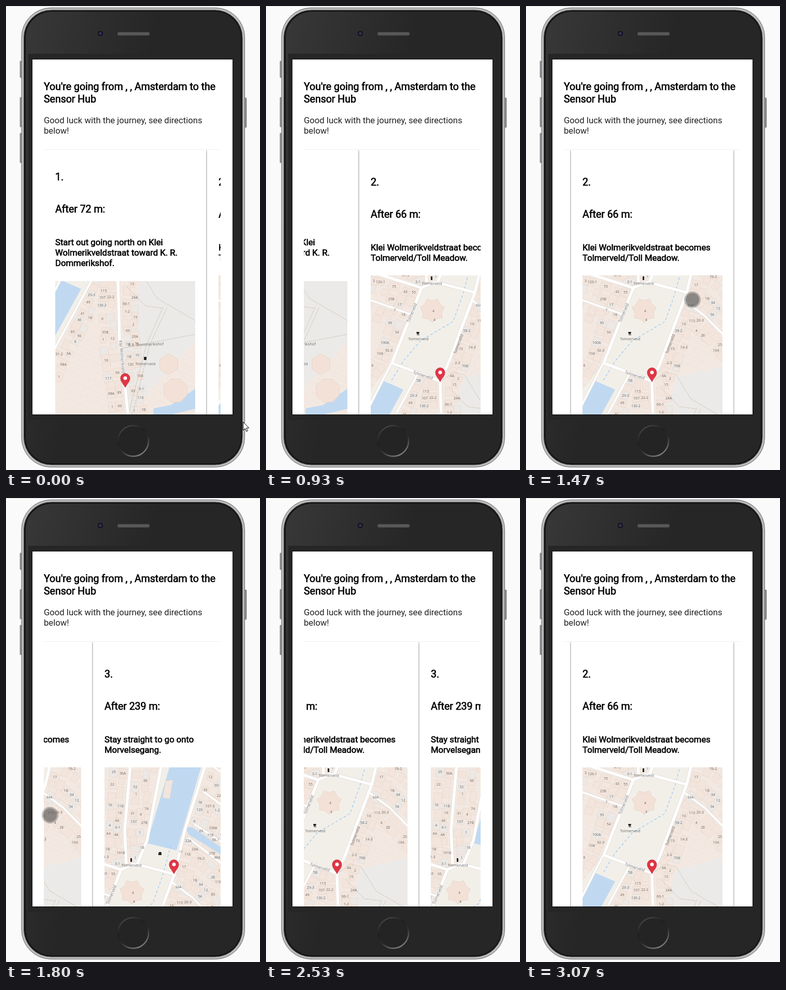
Recreate the animation shown at these times as an HTML page. Size 490 by 894 pixels, loop 3590 ms.

```html
<!DOCTYPE html>
<html lang="en">
<head>
<meta charset="utf-8">
<title>Route directions</title>
<style>
html, body { margin: 0; width: 100%; height: 100%; overflow: hidden; background: #fafafa; }
body { position: relative; font-family: Roboto, sans-serif; color: #000; }
#stage { position: absolute; left: 0; top: 0; width: 490px; height: 894px; overflow: hidden; }
#stage > svg { position: absolute; left: 0; top: 0; }
h2, h3, h4, p { position: absolute; margin: 0; white-space: nowrap; font-weight: 400; }
h2, h3 { font-size: 19.5px; line-height: 24px; }
h4, p { font-size: 16.67px; line-height: 20px; }
h2, h3, h4 { -webkit-text-stroke: .65px #000; }
#screen { position: absolute; left: 51px; top: 103px; width: 386px; height: 684px; background: #fff; }
#screen > h2 { left: 22px; top: 41px; }
#screen > p { left: 22px; top: 108px; color: #222; }
#view { position: absolute; left: 22px; top: 173px; width: 341px; height: 511px; overflow: hidden; }
#track { position: absolute; left: 0; top: 0; height: 100%; }
.card { position: absolute; top: 1px; width: 313px; height: 560px; background: #fff;
  box-shadow: 0 1px 3px rgba(0,0,0,.38); }
.card > * { position: absolute; left: 22px; }
.card svg { width: 270px; height: 300px; overflow: hidden; }
</style>
</head>
<body>
<div id="stage">
<svg width="490" height="894">
  <defs>
    <linearGradient id="face" x1="0" y1="0" x2=".5" y2=".25"><stop offset="0" stop-color="#383838"/><stop offset="1" stop-color="#262626"/></linearGradient>
    <linearGradient id="ring" x1=".2" y1="0" x2=".75" y2="1"><stop offset="0" stop-color="#4b4b4b"/><stop offset=".35" stop-color="#1d1d1d"/><stop offset=".6" stop-color="#2c2c2c"/><stop offset="1" stop-color="#858585"/></linearGradient>
    <pattern id="mesh" width="3" height="3" patternUnits="userSpaceOnUse"><rect width="3" height="3" fill="#5c5c5c"/><path d="M0 0H1V1H0z" fill="#3a3a3a"/></pattern>
  </defs>
  <path d="M0 .5H490" stroke="#e2e2e4"/>
  <g fill="#8c8c92" stroke="#6e6e74" stroke-width=".6">
    <rect x="27" y="106" width="5" height="32" rx="1"/><rect x="27" y="176" width="5" height="57" rx="1"/>
    <rect x="27" y="245" width="5" height="57" rx="1"/><rect x="459" y="177" width="5" height="57" rx="1"/>
  </g>
  <rect x="30" y="3.5" width="430.5" height="885" rx="57" fill="#bbb" stroke="#6a6a6c"/>
  <rect x="34.5" y="8" width="421.5" height="876" rx="53" fill="#151515" stroke="#4a4a4a"/>
  <rect x="38" y="11" width="415" height="870" rx="50" fill="url(#face)"/>
  <rect x="43" y="92" width="402" height="706" fill="#262626"/>
  <rect x="50" y="102" width="388" height="686" fill="#0c0c0c"/>
  <circle cx="182" cy="53" r="6.5" fill="#191922" stroke="#3a3a3e"/><circle cx="182" cy="53" r="2.5" fill="#34345e"/>
  <rect x="215" y="50.5" width="62" height="6" rx="3" fill="url(#mesh)" stroke="#484848"/>
  <circle cx="245.5" cy="838" r="29.5" fill="#242424" stroke="url(#ring)" stroke-width="2.5"/>
</svg>

<div id="screen">
  <h2>You're going from , , Amsterdam to the<br>Sensor Hub</h2>
  <p>Good luck with the journey, see directions<br>below!</p>
  <div id="view"><div id="track"></div></div>
</div>

<svg width="490" height="894">
  <defs>
    <pattern id="plots" width="23" height="17" patternUnits="userSpaceOnUse" patternTransform="rotate(24)">
      <rect width="23" height="17" fill="#f3e9e2"/><path d="M0 0H23M0 0V10H13V17M13 10H23" fill="none" stroke="#eee1d8" stroke-width=".8"/>
    </pattern>
    <g id="world">
      <rect x="60" y="330" width="400" height="670" fill="url(#plots)"/>
      <path fill="#ebeae8" d="M290 715L392 690V840L262 980L252 848Z"/>
      <g id="houses" stroke="#e7d8cc" stroke-width=".7"></g>
      <path id="square" fill="#f2efe9" d="M150 688L207 543L230 533L257 487L290 330H373L330 467L310 552L258 690L243 723ZM150 688L201 706L95 910L60 800Z"/>
      <path id="water" fill="#c0d9f1" d="M302 340H363L314 506L257 492ZM331 461L344 461L450 535V556L395 511L337 475ZM133 722L172 739L122 829L60 860L109 766ZM312 969L345 963L400 926V968L310 990Z"/>
      <path fill="#f1e5dd" stroke="#d9d3cd" stroke-width=".6" d="M293 372L307 370L301 407L287 404Z"/>
      <g id="landmarks" fill="#f3e1d7" stroke="#e7d2c5" stroke-width=".8"></g>
      <g fill="none" stroke="#c4b0a2" stroke-width=".9" stroke-dasharray="2.5 1.5">
        <path d="M246 722L270 705L290 711L318 757L392 800M247 854L327 839L395 826M260 735L296 772L327 776"/>
        <path d="M330 774L298 846L262 985M337 776L304 848L270 985"/>
      </g>
      <path fill="none" stroke="#9ccaf2" stroke-width="1.3" stroke-dasharray="5 4" d="M303 497L287 555L268 608L205 645L172 684L147 725"/>
      <g id="roads" fill="none" stroke-linejoin="round"></g>
      <g id="labels" font-family="'Open Sans', 'Noto Sans', sans-serif" text-anchor="middle"></g>
      <path fill="#222" d="M197 628H203L202 632H198ZM198 633H203V634H198ZM225 521H228V528H225ZM279 511L281 509H284L285 511V515H279ZM293 870H298V876H293Z"/>
    </g>
    <g id="pin">
      <path d="M0 0C-4-8-9-11.5-9-18a9 9 0 0 1 18 0C9-11.5 4-8 0 0Z" fill="#e13545" stroke="#b92535" stroke-width=".8"/>
      <circle cy="-18" r="3.5" fill="#fff"/>
    </g>
  </defs>
  <g id="touch" fill="#4a4848">
    <circle r="16" fill-opacity=".34"/><circle r="13" fill-opacity=".4"/>
  </g>
  <path id="arrow" d="M.5.5V16.5L4.200 13L6.800 18.700L9.200 17.600L6.700 12H11.700Z" fill="#fff" stroke="#000"/>
</svg>
</div>

<script>
const $ = id => document.getElementById(id);

let seed = 7;
const random = () => (seed = seed * 16807 % 2147483647) / 2147483647;
const pick = (low, high) => low + (high - low) * random();

// One town plan; each card shows its own part of it.
const streets = [
  'M243 723L246 834L257 929L263 990', 'M150 688L243 723', 'M243 723L258 690L310 552L330 467L370 340',
  'M150 688L207 543', 'M90 506L207 543L230 533L246 535L310 552', 'M217 532L214 467L225 340',
  'M237 535L257 487L285 340'
];
const lanes = [
  'M90 560L186 594', 'M149 688L90 804', 'M201 706L118 860L95 910', 'M306 568L345 597L390 643L450 690',
  'M365 392L450 454', 'M348 455L450 523', 'M337 482L450 569', 'M387 346L450 392'
];
const strokes = (paths, width, color) =>
  `<path d="${paths.join('')}" stroke-width="${width}" stroke="${color}"/>`;
$('roads').innerHTML = strokes(streets, 6.6, '#ddd8d3') + strokes(lanes, 5, '#ddd8d3') +
  strokes(streets, 5.4, '#fff') + strokes(lanes, 3.8, '#fff');

const label = (text, x, y, turn = 0, size = 6.8, fill = '#686868') =>
  `<text transform="translate(${x} ${y}) rotate(${turn})" y="${size * .36}" font-size="${size}" fill="${fill}">${text}</text>`;

const pen = document.createElement('canvas').getContext('2d');
const open = ['square', 'water'].map(id => new Path2D($(id).getAttribute('d')));
const isOpen = (x, y) => open.some(area => pen.isPointInPath(area, x, y));

// Rows of numbered houses follow both sides of every road.
function houseNumber() {
  const n = Math.ceil(random() ** 2 * 130), kind = random();
  return kind < .2 ? n + 'AB'[n % 2] : kind < .4 ? `${n}-${1 + n % 3}` : n;
}
const placed = [];
let houses = '', labels = '';
for (const d of [...streets, ...lanes]) {
  const road = document.createElementNS('http://www.w3.org/2000/svg', 'path');
  road.setAttribute('d', d);
  for (let s = 8; s < road.getTotalLength() - 8; s += 13) {
    const a = road.getPointAtLength(s - 2), b = road.getPointAtLength(s + 2);
    const angle = Math.atan2(b.y - a.y, b.x - a.x);
    for (const side of [-30, -14, 14, 30]) {
      const x = a.x - Math.sin(angle) * side + pick(-3, 3), y = a.y + Math.cos(angle) * side + pick(-2, 2);
      if (isOpen(x, y) || placed.some(p => Math.hypot(p.x - x, p.y - y) < 13)) continue;
      placed.push({ x, y });
      const w = pick(11, 22), h = pick(10, 17), fill = random() < .25 ? '#ece8e5' : '#f3e5dc';
      houses += `<rect x="${-w / 2}" y="${-h / 2}" width="${w}" height="${h}" fill="${fill}"
        transform="translate(${x} ${y}) rotate(${angle * 180 / Math.PI})"/>`;
      if (random() < .62) labels += label(houseNumber(), x, y);
    }
  }
}
$('houses').innerHTML = houses;

const names = [
  ['Tolmerveld', 227, 534, 0], ['Tolmerveld', 188, 591, -68], ['Tolmerveld', 278, 651, -70],
  ['Tolmerveld', 210, 711, 18], ['Tolmerveld', 201, 641, 0], ['Tolmerveld', 296, 883, 0],
  ['Klei Wolmerikveldstraat', 252, 880, 84], ['K.R. Dommerikshof', 297, 846, -2]
];
$('labels').innerHTML = labels + label(4, 230, 588) + label(4, 232, 605) +
  names.map(([text, x, y, turn]) => label(text, x, y, turn, 7.6)).join('');

function tower(x, y, r, sides, bump) {
  const corners = Array.from({ length: sides }, (_, i) => {
    const a = (i + .5) / sides * 2 * Math.PI, d = r * (i % 2 ? 1 : bump);
    return `${x + d * Math.cos(a)},${y + d * Math.sin(a)}`;
  });
  return `<polygon points="${corners.join(' ')}"/>`;
}
$('landmarks').innerHTML = tower(228, 586, 24, 14, .78) + tower(354, 935, 24, 8, 1) + tower(341, 884, 20, 6, 1);

const cards = [
  { away: '72 m', text: 'Start out going north on Klei<br>Wolmerikveldstraat toward K. R.<br>Dommerikshof.',
    top: 41, map: 253, origin: [122, 724], pin: [257, 929] },
  { away: '66 m', text: 'Klei Wolmerikveldstraat becomes<br>Tolmerveld/Toll Meadow.',
    top: 51, map: 242, origin: [109, 519], pin: [243, 724] },
  { away: '239 m', text: 'Stay straight to go onto<br>Morvelsegang.',
    top: 51, map: 242, origin: [175, 346], pin: [309, 551] }
];
$('track').innerHTML = cards.map((c, i) => `
  <div class="card" style="left:${315 * i}px">
    <h3 style="top:${c.top}px">${i + 1}.</h3>
    <h3 style="top:${c.top + 62}px">After ${c.away}:</h3>
    <h4 style="top:${c.top + 128}px">${c.text}</h4>
    <svg style="top:${c.map}px" viewBox="${c.origin.join(' ')} 270 300">
      <use href="#world"/><use href="#pin" x="${c.pin[0]}" y="${c.pin[1]}"/>
    </svg>
  </div>`).join('');

const LOOP = 3590, TICK = 1000 / 15;
const clamp = v => Math.min(1, Math.max(0, v));
const easeOut = (p, power) => 1 - (1 - clamp(p)) ** power;

const swipes = [
  { from: 530, lasts: 907, by: -301, power: 2 },
  { from: 1600, lasts: 545, by: -314, power: 3 },
  { from: 2200, lasts: 798, by: 314, power: 2 }
];
const scroll = t => swipes.reduce((x, s) => x + s.by * easeOut((t - s.from) / s.lasts, s.power), 0);

// Pointer stops: time, x, y.
const stops = [[0, 457, 801], [530, 358, 484], [800, 203, 500], [1330, 345, 545], [1470, 320, 566], [1600, 320, 572],
  [1800, 85, 611], [1870, 77, 614], [2200, 149, 637], [2530, 355, 690], [2600, 442, 791], [2670, 423, 791]];
function pointer(t) {
  const n = stops.findIndex(s => s[0] > t);
  if (n < 0) return stops[stops.length - 1].slice(1);
  const [t0, x0, y0] = stops[n - 1], [t1, x1, y1] = stops[n], p = (t - t0) / (t1 - t0);
  return [x0 + (x1 - x0) * p, y0 + (y1 - y0) * p];
}

const within = (t, a, b) => t >= a && t < b;
const show = (id, on) => { $(id).style.display = on ? '' : 'none'; };

// The picture changes 15 times a second.
function draw() {
  const time = (performance.now() - start) % LOOP;
  const t = Math.floor((time + 4) / TICK) * TICK;
  const [x, y] = pointer(t).map(Math.round);
  $('track').style.transform = `translateX(${Math.round(scroll(t))}px)`;
  for (const id of ['touch', 'arrow']) $(id).setAttribute('transform', `translate(${x} ${y})`);
  show('touch', within(t, 260, 860) || within(t, 1330, 2530));
  show('arrow', within(t, 0, 260) || within(t, 2595, 2730));
  requestAnimationFrame(draw);
}
const start = performance.now();
draw();
</script>
</body>
</html>
```
